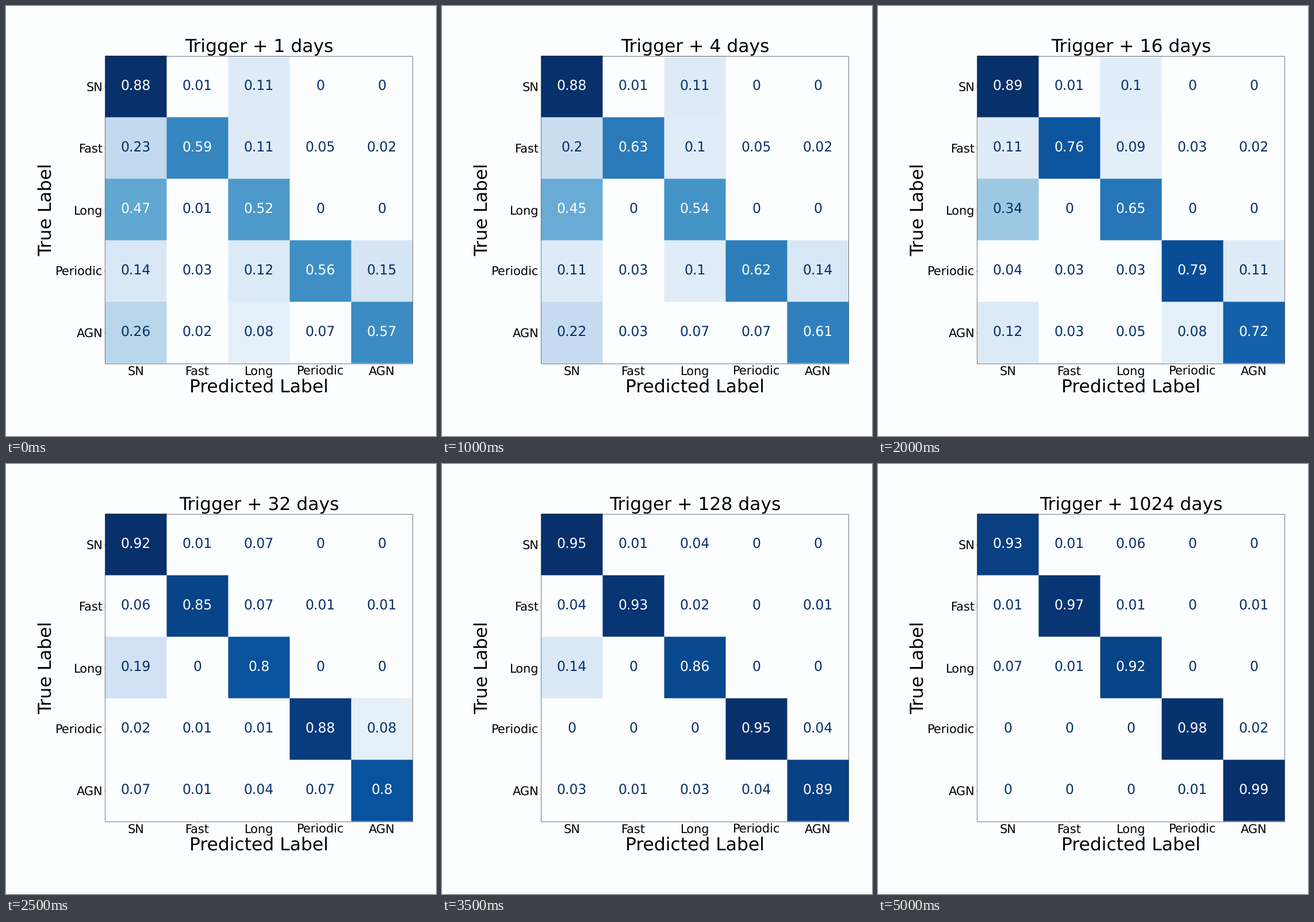
Write a matplotlib script that moves like this. It is 748x748 px and loops after 5.5 s.

```python
import matplotlib.pyplot as plt
import numpy as np
from matplotlib.animation import FuncAnimation
from matplotlib.patches import Rectangle

plt.rcParams.update({"font.family": "DejaVu Sans", "text.hinting": "none",
                     "toolbar": "None"})

SIZE, DPI, STEPS, STEP_MS = 748, 100, 11, 500
LABELS = ["SN", "Fast", "Long", "Periodic", "AGN"]
N, CELL = len(LABELS), 107
LEFT, TOP = 172.5, 86.5
RIGHT, BOTTOM = LEFT + N * CELL, TOP + N * CELL
MID_X, MID_Y = 226.1, 140.2
PAPER, NAVY = (251 / 255, 253 / 255, 1), "#08306b"
UNIT = 0.5235 * 72 / DPI
BIG, MEDIUM, SMALL, HAIR = (s * UNIT for s in (60, 45, 40, 1))


def path(*points):
    """Straight runs between (step, percent) points, level outside them."""
    return lambda step: np.interp(step, *zip(*points))


def level(percent):
    return lambda step: percent


# Share of each true class that is mistaken for another one.
MISTAKES = {
    "SN": {
        "Fast": level(1),
        "Long": path((0, 11.4), (4, 9.8), (5, 7), (7, 4), (10, 6)),
    },
    "Fast": {
        "SN": path((0, 23), (2, 20), (5, 6), (10, 1)),
        "Long": path((0, 11), (4, 9), (7, 2), (10, 0.6)),
        "Periodic": path((2, 5), (6, 0.2)),
        "AGN": path((4, 2), (5, 1)),
    },
    "Long": {
        "SN": path((0, 47), (2, 45), (4, 34), (5, 19.2), (7, 13.7), (9, 11),
                   (10, 7)),
        "Fast": path((0, 0.6), (5, 0), (10, 0.6)),
        "Periodic": level(0.2),
        "AGN": level(0.2),
    },
    "Periodic": {
        "SN": path((0, 14), (2, 11), (4, 3.5), (6, 0.5), (7, 0.4)),
        "Fast": path((4, 2.8), (6, 0.1)),
        "Long": path((0, 12), (2, 10), (4, 2.9), (6, 0)),
        "AGN": path((0, 15), (2, 14), (4, 11.4), (5, 7.5), (7, 4.2),
                    (9, 1.8)),
    },
    "AGN": {
        "SN": path((0, 25.5), (2, 22), (5, 6.6), (9.2, 0)),
        "Fast": path((0, 2.3), (4, 3), (5, 1.3), (9, 0.4)),
        "Long": path((0, 8.4), (7, 2.6), (9, 0.2)),
        "Periodic": path((0, 7.2), (4, 7.7), (5, 7.45), (7, 4), (10, 0.8)),
    },
}


def matrix(step):
    """Mistakes from their paths; the diagonal is what remains of each row."""
    m = np.zeros((N, N))
    for r, true in enumerate(LABELS):
        for guess, share in MISTAKES[true].items():
            m[r, LABELS.index(guess)] = share(step)
        m[r, r] = 100 - m[r].sum()
    return np.floor(m + 0.5) / 100


def shade(ratio):
    return plt.cm.Blues(ratio) if ratio > 0.085 else PAPER


fig = plt.figure(figsize=(SIZE / DPI, SIZE / DPI), dpi=DPI, facecolor=PAPER)
ax = fig.add_axes([0, 0, 1, 1])
ax.set(xlim=(0, SIZE), ylim=(SIZE, 0))
ax.axis("off")


def write(x, y, text, size, ha="center", va="baseline", **kw):
    return ax.text(x, y, text, size=size, ha=ha, va=va, **kw)


def hairline(xs, ys):
    ax.plot(xs, ys, color="black", lw=HAIR, solid_capstyle="butt", zorder=3)


boxes, values = {}, {}
for r, c in np.ndindex(N, N):
    # Inner cells reach one pixel under the next, so no seam shows.
    boxes[r, c] = ax.add_patch(Rectangle(
        (LEFT + c * CELL, TOP + r * CELL), CELL + (c < N - 1),
        CELL + (r < N - 1), lw=0, snap=False))
    values[r, c] = write(MID_X + c * CELL, MID_Y + r * CELL, "", MEDIUM,
                         va="center")

for x in (LEFT, RIGHT):
    hairline((x, x), (TOP, BOTTOM))
for y in (TOP, BOTTOM):
    hairline((LEFT, RIGHT), (y, y))

for k, label in enumerate(LABELS):
    x, y = MID_X + k * CELL, MID_Y + k * CELL
    hairline((x, x), (BOTTOM, BOTTOM + 1.8))
    hairline((LEFT - 1.8, LEFT), (y, y))
    write(x, 641.3, label, SMALL)
    write(168.7, y, label, SMALL, ha="right", va="center_baseline")

title = write(440.1, 81, "", BIG)
write(440.1, 671.8, "Predicted Label", BIG)
write(78.3, 354.2, "True Label", BIG, rotation=90, rotation_mode="anchor")


def draw(step):
    m = matrix(step)
    title.set_text(f"Trigger + {2 ** step} days")
    middle = (m.max() + m.min()) / 2
    for cell, box in boxes.items():
        box.set_facecolor(shade(m[cell] / m.max()))
        values[cell].set_text(f"{m[cell]:g}")
        values[cell].set_color(PAPER if m[cell] > middle else NAVY)
    return [title, *boxes.values(), *values.values()]


anim = FuncAnimation(fig, draw, frames=STEPS, interval=STEP_MS, repeat=True,
                     repeat_delay=0, blit=False)
plt.show()
```
